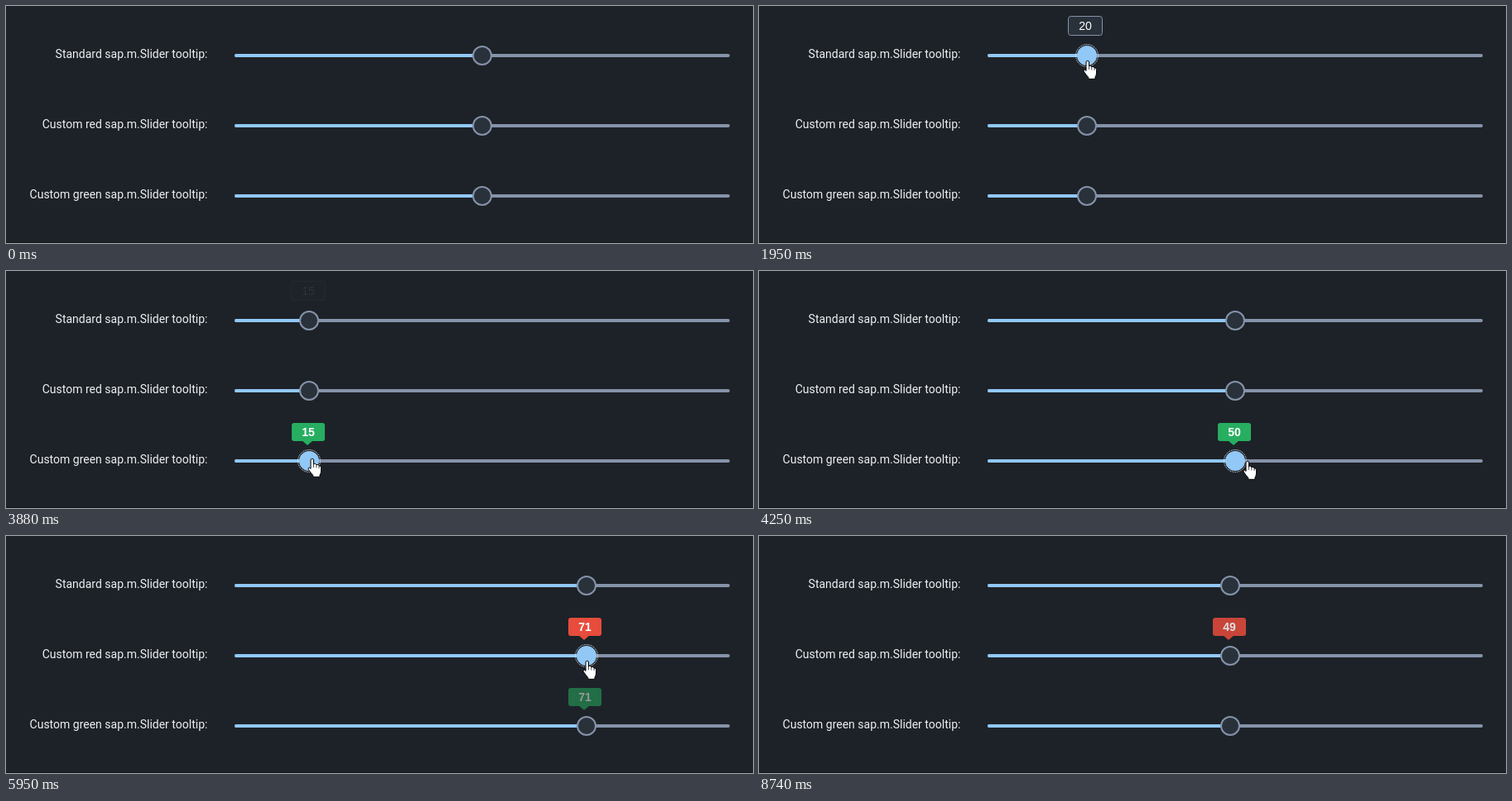
These frames come from a looping animation (902x287 px, 8790 ms). An HTML page:

```html
<!DOCTYPE html>
<html lang="en">
<head>
<meta charset="utf-8">
<title>Slider tooltips</title>
<style>
  html, body { margin: 0; width: 100%; height: 100%; overflow: hidden; background: #1d2228; }
  svg { display: block; }
  .label { font: 14px Roboto, sans-serif; fill: #eef0f2; text-anchor: end; }
  .tip text { font: 14px "Liberation Sans", Arial, sans-serif; fill: #fff; text-anchor: middle; }
  .tip.custom text { font-weight: bold; }
</style>
</head>
<body>
<svg id="stage" width="902" height="287" viewBox="0 0 902 287"></svg>
<script>
const LOOP = 8790, LEFT = 276, WIDTH = 598, FADE = 200, HOVER_REACH = 21;
const ACCENT = '#91c8f6', LINE = '#8593a9', THUMB = '#29313b';

// A slider is pressed and focused at the same moment; times are in ms.
const rows = [
  { y: 60, label: 'Standard sap.m.Slider tooltip:', press: 1380, release: 2280, blur: 3720 },
  { y: 145, label: 'Custom red sap.m.Slider tooltip:', press: 5860, release: 6790, blur: 8692,
    color: '#e74c3c' },
  { y: 230, label: 'Custom green sap.m.Slider tooltip:', press: 3720, release: 5190, blur: 5860,
    color: '#27ae60' }
];

const drags = [
  { start: 1490, end: 2180, to: [15] },
  { start: 3906, end: 4706, to: [71] },
  { start: 5990, end: 6650, to: [49] }
];

const pointerMoves = [
  { start: 160, end: 680, to: [580, 66] },
  { start: 1470, end: 2180, to: [371, 66] },
  { start: 2280, end: 2700, to: [372, 154] },
  { start: 2905, end: 3260, to: [370, 227] },
  { start: 3884, end: 4684, to: [704, 232] },
  { start: 5190, end: 5580, to: [702, 151] },
  { start: 5990, end: 6650, to: [572, 158] },
  { start: 7070, end: 7250, to: [568, 166] },
  { start: 7410, end: 8240, to: [757, 276] },
  { start: 8250, end: 8330, to: [780, 287] }
];

const easeOut = u => Math.sin(u * Math.PI / 2);
const swing = u => 0.5 - Math.cos(Math.PI * u) / 2;
const toX = value => LEFT + WIDTH * value / 100;
const between = (t, start, end) => t >= start && t < end;

// Plays eased moves one after another, each from where the last one ended.
function follow(origin, moves, t) {
  return moves.reduce((point, { start, end, to }) => {
    const u = easeOut(Math.min(1, Math.max(0, (t - start) / (end - start))));
    return point.map((from, i) => from + (to[i] - from) * u);
  }, origin);
}

const valueAt = t => Math.round(follow([50], drags, t)[0]);
const pointerAt = t => follow([753, 278], pointerMoves, t).map(Math.round);
const pointerShown = t => between(t, 160, 8330);
const hovers = (row, t) => pointerShown(t) && Math.abs(pointerAt(t)[1] - row.y) < HOVER_REACH;
const focused = (row, t) => between(t, row.press, row.blur);

// The tooltip fades with the share of the last moments it was called for.
function tipOpacity(row, t) {
  const samples = 40;
  let active = 0;
  for (let i = 0; i < samples; i++) {
    const past = t - FADE * i / samples;
    if (focused(row, past) || hovers(row, past)) active++;
  }
  return swing(active / samples);
}

const svg = document.getElementById('stage');

function set(node, attrs) {
  for (const name in attrs) node.setAttribute(name, attrs[name]);
}

function add(parent, tag, attrs = {}, text = '') {
  const node = document.createElementNS('http://www.w3.org/2000/svg', tag);
  set(node, attrs);
  node.textContent = text;
  return parent.appendChild(node);
}

function buildRow(row) {
  const { y, color } = row;
  add(svg, 'text', { class: 'label', x: 243.4, y: y + 3 }, row.label);
  add(svg, 'rect', { x: LEFT, y: y - 2, width: WIDTH, height: 4, rx: 2, fill: LINE });
  row.progress = add(svg, 'rect', { x: LEFT, y: y - 2, height: 4, rx: 2, fill: ACCENT });
  row.thumb = add(svg, 'g');
  row.knob = add(row.thumb, 'circle', { r: 11, 'stroke-width': 2 });
  row.ring = add(row.thumb, 'circle', {
    r: 13.5, fill: 'none', stroke: '#fff', 'stroke-dasharray': '1 1'
  });
  row.tip = add(svg, 'g', { class: color ? 'tip custom' : 'tip' });
  if (color) {
    add(row.tip, 'rect', { width: 40, height: 22, rx: 3, fill: color });
    add(row.tip, 'path', { d: 'M12 21H26L19 27Z', fill: color });
  } else {
    add(row.tip, 'rect', {
      x: -0.5, y: -1.5, width: 41, height: 23, rx: 3, fill: THUMB, stroke: LINE
    });
  }
  row.number = add(row.tip, 'text', { x: 20, y: color ? 16 : 15 });
}

add(svg, 'rect', { width: 902, height: 287, fill: '#1d2228' });
add(svg, 'rect', { y: 286, width: 902, height: 1, fill: '#12161b' });
rows.forEach(buildRow);

const pointer = add(svg, 'g', { fill: '#fff', stroke: '#000', 'stroke-linejoin': 'round' });
const arrow = add(pointer, 'path', {
  d: 'M.5 .5V16L4 12.8L6.3 18.3L8.8 17.2L6.5 11.8H11.4Z'
});
const hand = add(pointer, 'g');
add(hand, 'path', {
  d: 'M-2 2Q-2 .3-.3 .3Q1.5 .3 1.5 2V7Q2 6 3.5 6.4Q4.6 6.8 4.8 8Q5.5 7 7 7.6Q8 8 8 9.2' +
     'Q9 8.5 9.8 9.3Q10.5 10 10.5 11.5V15Q10.5 18 9 20V22.3H.8V20.5Q-1.5 18-4.5 13.8' +
     'Q-5.5 11.8-4.5 11.2Q-3.5 10.5-2 12.5Z'
});
add(hand, 'path', { d: 'M1.5 7V11M4.8 8V11.5M8 9.2V12', fill: 'none', 'stroke-width': 0.7 });

function drawRow(row, t) {
  const value = valueAt(t);
  const x = Math.round(toX(value));
  const pressed = between(t, row.press, row.release);
  set(row.progress, { width: x - LEFT });
  set(row.thumb, { transform: `translate(${x} ${row.y})` });
  set(row.knob, { fill: pressed ? ACCENT : THUMB, stroke: pressed ? ACCENT : LINE });
  set(row.ring, { visibility: focused(row, t) ? 'visible' : 'hidden' });
  set(row.tip, {
    opacity: tipOpacity(row, t),
    transform: `translate(${Math.round(toX(value) - 21.2)} ${row.y - 46})`
  });
  row.number.textContent = value;
}

function drawPointer(t) {
  const overSlider = rows.some(row => hovers(row, t));
  set(pointer, {
    transform: `translate(${pointerAt(t)})`,
    visibility: pointerShown(t) ? 'visible' : 'hidden'
  });
  set(hand, { display: overSlider ? 'inline' : 'none' });
  set(arrow, { display: overSlider ? 'none' : 'inline' });
}

function tick() {
  const t = performance.now() % LOOP;
  rows.forEach(row => drawRow(row, t));
  drawPointer(t);
  requestAnimationFrame(tick);
}
tick();
</script>
</body>
</html>
```
